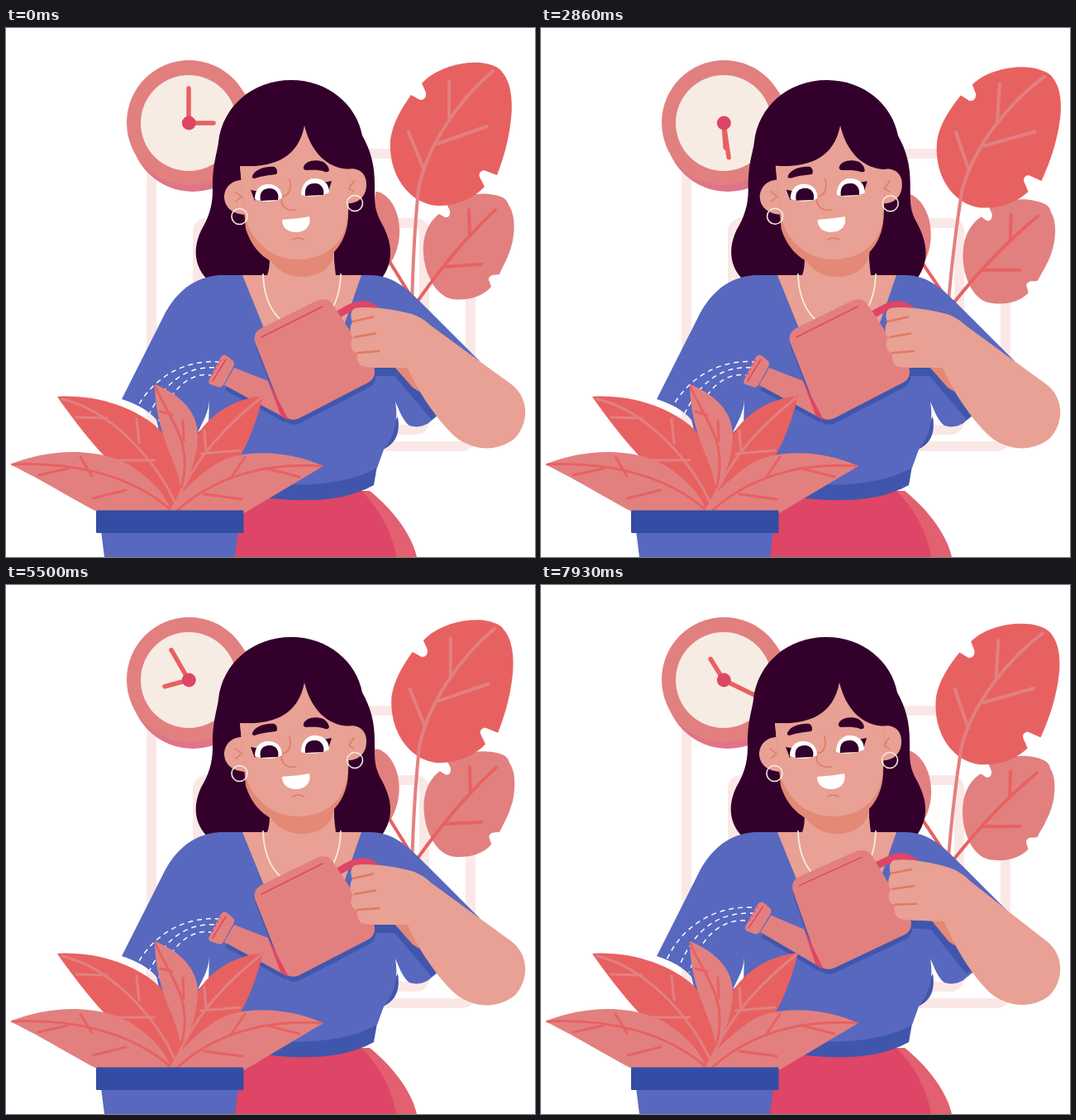
An HTML page that plays this animation: 640 px wide and 640 px high, repeating every 8 s.

```html
<!DOCTYPE html>
<html lang="en">
<head>
<meta charset="utf-8">
<title>Watering the plant</title>
<style>
  html, body { margin: 0; width: 100%; height: 100%; overflow: hidden; background: #fff; }
  svg { display: block; width: 100%; height: 100%; }
  .line { fill: none; stroke-linecap: round; stroke-linejoin: round; }
  .salmon { fill: #e28080; } .coral { fill: #e86161; } .pink { fill: #df4566; }
  .blue { fill: #5768be; } .navy { fill: #4056ac; } .skin { fill: #e8a194; }
  .blush { fill: #e38975; } .hair { fill: #33002c; } .white { fill: #fff; }
  .salmon-line { stroke: #e28080; } .coral-line { stroke: #e86161; }
  .pink-line { stroke: #df4566; } .crease { stroke: #e07a5f; } .cream { stroke: #f6ece3; }
</style>
</head>
<body>
<svg viewBox="0 0 640 640">
  <!-- wall frames -->
  <g fill="none" stroke="#fae8e6" stroke-width="12">
    <rect x="176" y="152" width="386" height="354" rx="10"/>
    <rect x="232" y="236" width="274" height="250" rx="10"/>
  </g>

  <!-- clock -->
  <circle cx="226" cy="122" r="76" fill="#e07488"/>
  <circle class="salmon" cx="221.5" cy="114.5" r="75.5"/>
  <circle cx="221" cy="115" r="58" fill="#f6ece3"/>
  <g class="line coral-line" stroke-width="5.5">
    <path id="hourHand" d="M221 115V85"/>
    <path id="minuteHand" d="M221 115V73"/>
  </g>
  <circle class="pink" cx="221.3" cy="115" r="8.5"/>

  <!-- plant behind -->
  <g id="smallLeaf">
    <path class="salmon" d="M447 198C458 197 478 216 476 250C475 270 466 285 460 291L440 270Z"/>
    <path class="line coral-line" stroke-width="4" d="M455 268L492 328"/>
  </g>
  <g id="lowLeaf">
    <path class="salmon" d="M505 262C506 248 512 234 524 225L531 229Q538 230 537 221L533 213C548 203 570 199 585 201C600 203 606 206 608 214C616 225 616 245 612 262C607 280 600 290 597 298L588 299Q582 302 585 307L587 313C575 327 555 330 540 328C520 325 503 295 505 262Z"/>
    <path class="line coral-line" stroke-width="4" d="M592 220C560 250 525 290 490 342M560 220L561 251M575 286L529 289"/>
  </g>
  <g id="highLeaf">
    <path class="coral" d="M465 135C468 115 478 98 490 81L501 87Q509 87 508 78L503 67C520 48 552 40 575 42C590 44 598 49 600 53C612 66 614 92 610 118C607 140 601 160 594 178L578 172Q571 174 573 180L579 192C565 207 545 215 523 215C490 214 462 180 465 135Z"/>
    <path class="line salmon-line" stroke-width="4" d="M589 52C550 85 510 140 499 195C495 235 492 290 491 340M536 64V110M582 119L522 140M487 126L506 172"/>
  </g>

  <!-- hair behind the shoulders -->
  <path class="hair head" d="M243 304C225 285 228 262 236 245C245 230 250 215 250 197C249 165 256 150 257 138C262 95 298 63 345 63C390 63 424 93 431 130C441 148 446 165 446 190C446 215 446 220 455 237C466 258 471 280 454 304Z"/>

  <!-- skirt and shirt -->
  <path fill="#e2606f" d="M270 560H440C465 580 490 610 497 640H270Z"/>
  <path class="pink" d="M270 560H430C455 585 468 615 472 640H270Z"/>
  <path class="navy" d="M449 530L445 553C410 572 370 574 320 569H230V530ZM474 470C478 495 468 505 452 512Z"/>
  <path class="blue" d="M140 449L190 350C202 325 225 299 262 299H440C470 299 488 318 508 338L573 403L522 469L511 478Q500 485 488 481C480 475 476 463 471 452C476 482 466 498 457 510L449 532C420 549 370 556 320 551H200L182 474C172 462 158 455 140 449Z"/>
  <path class="white" d="M246 450C245 465 239 475 232 489L245 480Z"/>
  <path class="skin" d="M286 299H316Q320 290 319 262H397V280Q398 292 399 299H430L395 400H327Z"/>

  <!-- face -->
  <g class="head">
    <path class="blush" d="M322 270H397V273C393 292 377 301 358 301C342 301 330 294 322 284Z"/>
    <path class="skin" d="M288 184C272 183 264 194 264 205C265 220 278 226 292 226ZM412 171C428 167 437 178 436 190C436 203 427 213 412 212Z"/>
    <path class="blush" d="M283 167L290 243C300 275 325 290 352 290C390 288 414 262 414 225L416 171Z"/>
    <path class="skin" d="M283 167L289 228C298 262 325 280 352 280C385 280 410 262 413.500 228L416 171C388 170 369 150 361 118C353 160 320 169 283 167Z"/>
    <path class="line crease" stroke-width="1.500" d="M277 198L285 204L278 210M421 185L415 194L421 198M343 183C346 195 342 203 334 204C331 214 338 222 351 220M347 256Q353 252 360 256"/>
    <path class="hair" d="M298 179C302 170 315 167 325 168Q330 172 327 177C316 178 306 180 301 182Q297 182 298 179ZM360 168C362 161 374 158 384 162Q390 166 391 172Q390 175 386 174C378 171 370 172 363 172Q359 171 360 168Z"/>
    <path class="hair" d="M296 196L307 198L301 209ZM394 185L384 187L390 198Z"/>
    <path class="white" d="M301 207C301 195 308 189 317 189C328 189 334 196 334 206C324 211 312 211 301 207ZM357 202C357 190 364 182 373 182C384 182 391 188 391 199C382 204 368 205 357 202Z"/>
    <path class="hair" d="M308 209C306 199 311 194 319 194C327 194 331 201 329 208ZM362 203C361 193 365 188 373 188C381 187 386 195 384 202Z"/>
    <path class="white" d="M334 232C345 231 358 230 367 228C370 240 361 247 351 247C339 247 334 240 334 232Z"/>
    <g class="line cream" stroke-width="1.600">
      <circle cx="282.500" cy="228" r="9.500"/>
      <circle cx="422" cy="212" r="9.500"/>
    </g>
  </g>
  <path class="line cream" stroke-width="1.800" d="M311 298C314 385 402 385 405 298"/>

  <g id="water" class="line" stroke="#fff" stroke-width="1.500" stroke-dasharray="6 5" style="stroke-linecap:butt">
    <path/><path/><path/>
  </g>

  <!-- watering can and arm -->
  <g id="arm">
    <path class="navy" d="M446 411L470 410L500 438L523 467L515 474L470 421L446 421Z"/>
    <use href="#canShape" class="navy" x="1" y="6"/>
    <path class="navy" d="M301 380L320 432L326 420Z"/>
    <path class="line pink-line" stroke-width="9" d="M401 347C415 339 424 333 436 335Q444 337 450 344"/>
    <g class="salmon">
      <g id="canShape">
        <path d="M309 363L374 331C384 326 392 328 397 337L444 409C448 416 446 425 438 429L355 472C346 476 339 473 335 466L302 382C299 374 301 367 309 363Z"/>
        <path d="M276 411L317 427L338 472L264 432Z"/>
      </g>
      <path d="M260 398Q264 393 269 398L275 403Q277 406 275 410L263 432Q260 436 256 434L247 431Q244 429 246 425Z"/>
    </g>
    <path class="pink" d="M314 421L342 474Q336 472 332 468L318 430Z"/>
    <path class="line pink-line" stroke-width="1.500" d="M309 374L383 337M266 401L250 427"/>
    <path class="line pink-line" stroke-width="1.300" stroke-dasharray="1 5" d="M260 402L249 421"/>
    <path class="blush" d="M470 410H488L500 440L492 435Z"/>
    <path class="skin" d="M423 339C440 336 470 341 487 345C497 347 508 354 514 360L570 401L610 430C635 448 632 480 615 497C595 512 570 512 548 498C530 485 500 445 486 411L470 411C455 411 435 412 429 408C424 402 425 398 425 394C416 390 416 380 420 375C415 370 416 360 419 356C416 348 417 341 423 339Z"/>
    <path class="line crease" stroke-width="2.500" d="M420 355L444 349.500M422 374L447 369.500M425 393L451 391"/>
  </g>

  <!-- potted plant in front -->
  <path class="coral" d="M62 446C105 443 155 457 186 486C210 515 215 550 203 583C170 570 120 530 62 446Z"/>
  <path class="coral" d="M311 445C275 449 248 466 230 494C212 525 203 550 200 583C250 575 290 530 311 445Z"/>
  <path class="line salmon-line" stroke-width="3" d="M68 449C125 462 180 520 205 575M85 471L122 472M158 473L161 502M135 523H180M309 447C255 490 225 530 205 575M240 487L242 513M236 515L283 511"/>
  <path class="salmon" d="M180 431C215 445 232 468 232 492C231 525 219 550 211 558C209 525 181 495 180 431Z"/>
  <path class="line coral-line" stroke-width="3" d="M181 434C195 470 228 500 212 556M187 464L201 468M214 475L215 500"/>
  <path class="salmon" d="M5 528C60 505 130 508 165 540C185 555 195 570 200 585H110C80 570 50 550 5 528Z"/>
  <path class="salmon" d="M384 530C340 510 280 508 250 530C225 548 208 565 197 585L288 587Z"/>
  <path class="line coral-line" stroke-width="3" d="M8 528C80 525 150 540 198 582M90 519L104 542M39 541L75 533M105 569L145 559M382 530C310 525 250 545 208 583M289 519L273 543M316 533L355 543M240 564L285 570"/>
  <path class="blue" d="M115 608H281L277 640H119Z"/>
  <rect x="109" y="583.500" width="178.500" height="27.500" rx="1.500" fill="#344da4"/>
</svg>
<script>
  const LOOP = 8000, GESTURE = 7200, SWAY = 2400;
  const byId = id => document.getElementById(id);
  const heads = document.querySelectorAll('.head');
  const jets = byId('water').children;

  const ease = u => u < .5 ? 4 * u ** 3 : 1 - 4 * (1 - u) ** 3;
  const rotate = (el, angle, x, y) => el.setAttribute('transform', `rotate(${angle} ${x} ${y})`);

  // Eased value between [time, value] keys.
  function keyed(keys, t) {
    const i = keys.findIndex(key => key[0] > t);
    if (i === 0) return keys[0][1];
    if (i < 0) return keys[keys.length - 1][1];
    const [t0, a] = keys[i - 1], [t1, b] = keys[i];
    return a + (b - a) * ease((t - t0) / (t1 - t0));
  }

  // Each jet: start, two control points, end.
  const jetPoints = [
    [[259, 404], [215, 400], [175, 425], [156, 464]],
    [[256, 411], [215, 408], [190, 432], [172, 470]],
    [[248, 420], [222, 416], [198, 438], [184, 478]]
  ];
  const jetLift = [[4, -18], [-3, -18], [-6, -18], [-6, -12]];

  function draw(now) {
    const t = now % LOOP, g = t % GESTURE;

    rotate(byId('minuteHand'), t * .06, 221, 115);
    rotate(byId('hourHand'), 90 + t * .03, 221, 115);

    const phase = t / SWAY % 2;
    const sway = 3.82 * ease(phase < 1 ? phase : 2 - phase);
    rotate(byId('highLeaf'), sway, 490, 358);
    rotate(byId('lowLeaf'), sway, 474, 358);
    rotate(byId('smallLeaf'), -sway * .7, 492, 345);

    const lift = keyed([[0, 0], [1200, 1], [2400, 0]], g);
    rotate(byId('arm'), 2.75 * lift, 595, 465);

    const tilt = keyed([[2400, 0], [3000, .22], [4200, -.53], [4800, 0]], g);
    heads.forEach(el => rotate(el, tilt, 355, 400));

    jetPoints.forEach((points, i) => {
      const [start, ...rest] = points.map(([x, y], k) =>
        [x + jetLift[k][0] * lift, y + jetLift[k][1] * lift]);
      jets[i].setAttribute('d', `M${start}C${rest.join(' ')}`);
      jets[i].setAttribute('stroke-dashoffset', -t * .03 - i * 4);
    });
    requestAnimationFrame(() => draw(performance.now()));
  }
  draw(performance.now());
</script>
</body>
</html>
```
